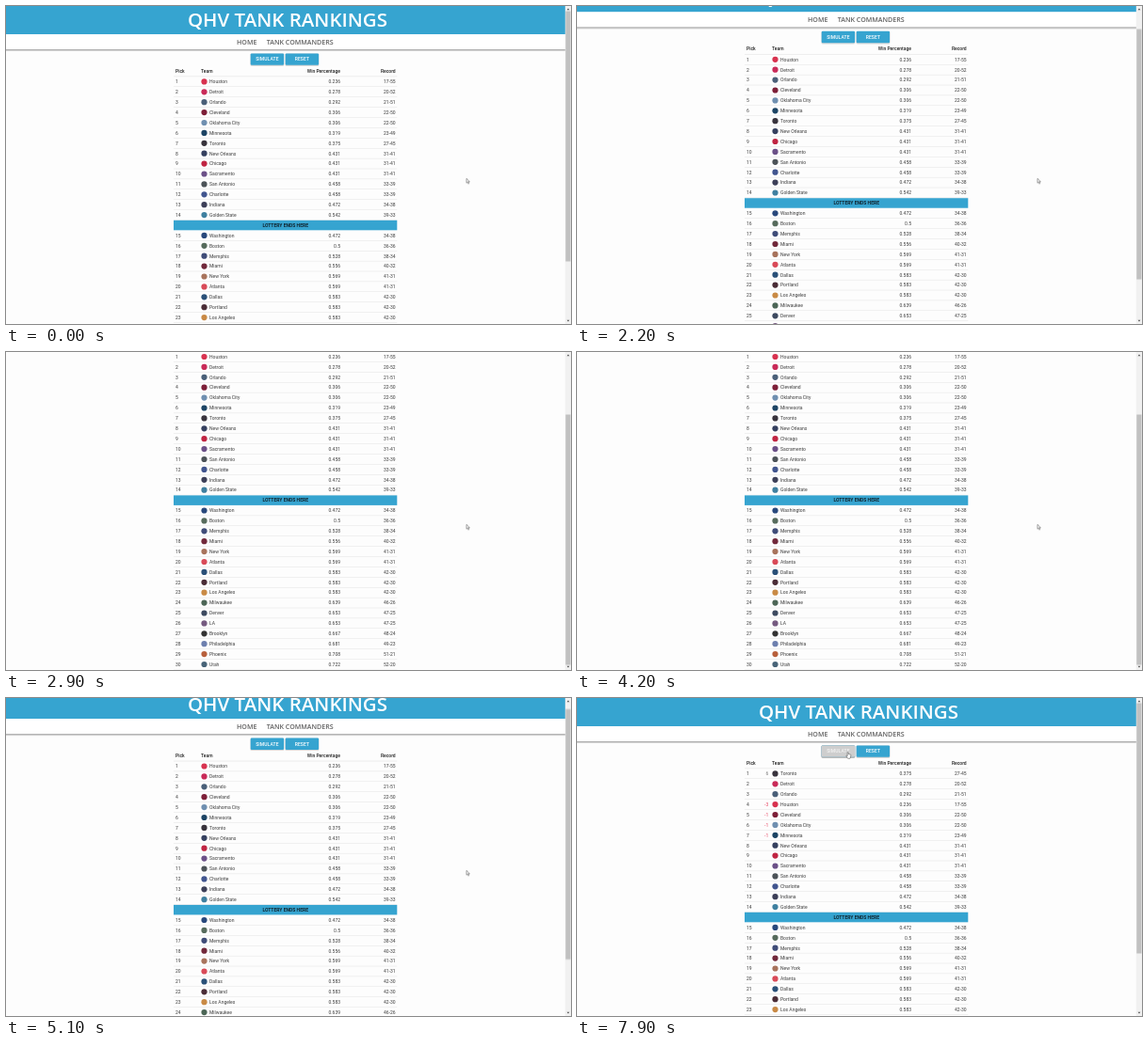
An HTML page that plays this animation: 600 by 338 pixels, repeating every 8000 ms.

```html
<!DOCTYPE html>
<html lang="en">
<head>
<meta charset="utf-8">
<title>Tank Rankings</title>
<style>
html, body { margin: 0; width: 100%; height: 100%; overflow: hidden; background: #fdfdfd; }
svg { display: block; width: 100vw; height: 100vh; }
text { font: 5px Roboto, sans-serif; fill: #3c3c3c; }
.end { text-anchor: end; }
.mid { text-anchor: middle; }
.head { font-weight: 500; fill: #222; }
.title { font: 600 20.5px "Open Sans", sans-serif; fill: #fff; }
.nav { font: 600 7.1px "Open Sans", sans-serif; fill: #606060; }
.label { font-weight: 500; letter-spacing: .1px; fill: #fff; }
.strip { font-weight: 700; fill: #10242e; }
.blue { fill: #36a4d0; }
.up { fill: #777; }
.down { fill: #e8415f; }

.page, .thumb, .body, .arrow { animation: 8s linear infinite; }
.page { animation-name: scroll; }
.thumb { animation-name: thumb; }
.body { animation-name: nudge; }
.arrow { animation-name: point; }
.before, .after, .hand, .loader, .disabled { animation: 8s step-end infinite; }
.before { animation-name: before; }
.after { animation-name: after; }
.hand { animation-name: hand; }
.loader { animation-name: loader; }
.disabled { animation-name: disabled; }
.spin { animation: spin 1s linear infinite; }

@keyframes scroll {
  0%, 23.75% { transform: translateY(0); }
  31.25% { transform: translateY(-47px); }
  35.6%, 57.9% { transform: translateY(-75.4px); }
  58.75% { transform: translateY(-69.8px); }
  64.4%, 100% { transform: translateY(0); }
}
@keyframes thumb {
  0%, 23.75% { transform: translateY(0); }
  31.25% { transform: translateY(38px); }
  35.6%, 57.9% { transform: translateY(61px); }
  58.75% { transform: translateY(56.4px); }
  64.4%, 100% { transform: translateY(0); }
}
@keyframes nudge {
  0%, 22.5% { transform: translateY(0); }
  23.75% { transform: translateY(-1px); }
  25%, 100% { transform: translateY(0); }
}
@keyframes point {
  0%, 67.5% { transform: translate(489px, 183.3px); visibility: visible; }
  74.99% { transform: translate(288px, 57.5px); visibility: visible; }
  75%, 100% { transform: translate(288px, 57.5px); visibility: hidden; }
}
@keyframes hand { 0% { visibility: hidden; } 75%, 100% { visibility: visible; } }
@keyframes disabled { 0% { visibility: hidden; } 78.75%, 100% { visibility: visible; } }
@keyframes loader { 0% { visibility: hidden; } 78.75% { visibility: visible; } 92.5%, 100% { visibility: hidden; } }
@keyframes before { 0% { visibility: visible; } 92.5%, 100% { visibility: hidden; } }
@keyframes after { 0% { visibility: hidden; } 92.5%, 100% { visibility: visible; } }
@keyframes spin { to { transform: rotate(360deg); } }
</style>
</head>
<body>
<svg viewBox="0 0 600 338" preserveAspectRatio="none">
  <defs>
    <linearGradient id="fade" x2="0" y2="1">
      <stop stop-color="#000" stop-opacity=".38"/>
      <stop offset="1" stop-color="#000" stop-opacity="0"/>
    </linearGradient>
  </defs>
  <rect width="600" height="338" fill="#fdfdfd"/>

  <g class="page">
    <rect class="blue" width="594" height="30"/>
    <rect y="30" width="594" height="16" fill="#fff"/>
    <rect y="46" width="594" height="2.6" fill="url(#fade)"/>
    <text class="title end" x="405" y="22">QHV TANK RANKINGS</text>
    <text class="nav" x="245" y="41">HOME</text>
    <text class="nav" x="276.7" y="41">TANK COMMANDERS</text>

    <g id="buttons"></g>

    <g class="head">
      <text class="head" x="180" y="70.6">Pick</text>
      <text class="head" x="207" y="70.6">Team</text>
      <text class="head end" x="355" y="70.6">Win Percentage</text>
      <text class="head end" x="413.7" y="70.6">Record</text>
      <rect x="178" y="74.7" width="237.3" height=".4" fill="#d8d8d8"/>
    </g>
    <g class="body" id="body"></g>
  </g>

  <g class="loader">
    <g transform="translate(296.5 145.3)" fill="none" stroke-width="3.4">
      <circle r="19.3" stroke="#d6f0fa"/>
      <g class="spin">
        <circle r="19.3" stroke="#35b0e2" pathLength="360" stroke-dasharray="86 274" transform="rotate(-148)"/>
      </g>
    </g>
  </g>

  <rect x="593.8" width="6.2" height="338" fill="#f1f1f1"/>
  <rect class="thumb" x="594.3" y="5.5" width="5.2" height="266" fill="#c1c1c1"/>
  <path d="M595.6 4.2l1.4-1.6 1.4 1.6zM595.6 333.8l1.4 1.6 1.4-1.6z" fill="#505050"/>

  <path class="arrow" d="M0 0v4.8l1.1-1 .8 1.8.8-.4-.8-1.7h1.5z" fill="#fff" stroke="#333" stroke-width=".45"/>
  <path class="hand" d="M287.2 57.6q.6-.6 1 0v2l2.2.5q.6.2.5.8l-.5 2.2-.5 1.2h-2.3l-1.8-2.7q.2-.8 1.4.2z"
    fill="#fff" stroke="#333" stroke-width=".45"/>
</svg>

<script>
const PITCH = 10.9, TOP = 80.4, LOTTERY = 14, GAMES = 72;

// name, wins, badge colour
const teams = `Houston,17,#d8324f|Detroit,20,#c92a58|Orlando,21,#4a5f78|Cleveland,22,#7d1f38
Oklahoma City,22,#6f8fb0|Minnesota,23,#1c4464|Toronto,27,#38333c|New Orleans,31,#35405f
Chicago,31,#c02442|Sacramento,31,#6b5088|San Antonio,33,#4c5358|Charlotte,33,#41558f
Indiana,34,#3c3f58|Golden State,39,#3f80a0|Washington,34,#28487c|Boston,36,#566b5c
Memphis,38,#3f4c78|Miami,40,#71283a|New York,41,#a8735c|Atlanta,41,#d94a58
Dallas,42,#2a5078|Portland,42,#4a2c36|Los Angeles,42,#c98a45|Milwaukee,46,#4c6656
Denver,47,#3d4a60|LA,47,#755a80|Brooklyn,48,#333333|Philadelphia,49,#6d7fae
Phoenix,51,#b8603c|Utah,52,#486478`.split(/[|\n]/).map(s => s.split(","));

const text = (x, y, s, cls = "") => `<text class="${cls}" x="${x}" y="${y}">${s}</text>`;

const button = (x, s, fill, ink) => `
  <rect x="${x - .3}" y="50.6" width="36" height="13.4" rx="1.4" fill="#000" opacity=".14"/>
  <rect x="${x}" y="50.4" width="35.4" height="12.4" rx="1.2" fill="${fill}"/>
  <text class="label mid" x="${x + 17.7}" y="58.4" style="fill:${ink}">${s}</text>`;

function row([name, wins, colour], i, move = 0) {
  const mid = TOP + PITCH * (i + (i >= LOTTERY)), y = mid + 1.8;
  return `<rect x="178" y="${mid + 5.2}" width="237.3" height=".4" fill="#dcdcdc"/>
    <circle cx="210.5" cy="${mid}" r="3.1" fill="${colour}"/>`
    + text(180, y, i + 1) + text(216, y, name)
    + text(355, y, +(wins / GAMES).toFixed(3), "end")
    + text(413.7, y, `${wins}-${GAMES - wins}`, "end")
    + (move ? text(203.3, y, move, move > 0 ? "end up" : "end down") : "");
}

const group = (cls, rows) => `<g class="${cls}">${rows.join("")}</g>`;
const barY = TOP + PITCH * LOTTERY;

// the draw changes only the first seven picks
const drawn = [6, 1, 2, 0, 3, 4, 5];

document.getElementById("buttons").innerHTML =
  button(259.7, "SIMULATE", "#36a4d0", "#fff") + button(296.7, "RESET", "#36a4d0", "#fff")
  + `<g class="disabled">${button(259.7, "SIMULATE", "#cecece", "#f3f3f3")}</g>`;

document.getElementById("body").innerHTML =
  group("before", teams.slice(0, 7).map((t, i) => row(t, i)))
  + group("after", drawn.map((k, i) => row(teams[k], i, k - i)))
  + group("rest", teams.slice(7).map((t, i) => row(t, i + 7)))
  + `<rect class="blue" x="178" y="${barY - 5.2}" width="237.3" height="10.5"/>`
  + text(296.7, barY + 1.8, "LOTTERY ENDS HERE", "strip mid");
</script>
</body>
</html>
```
